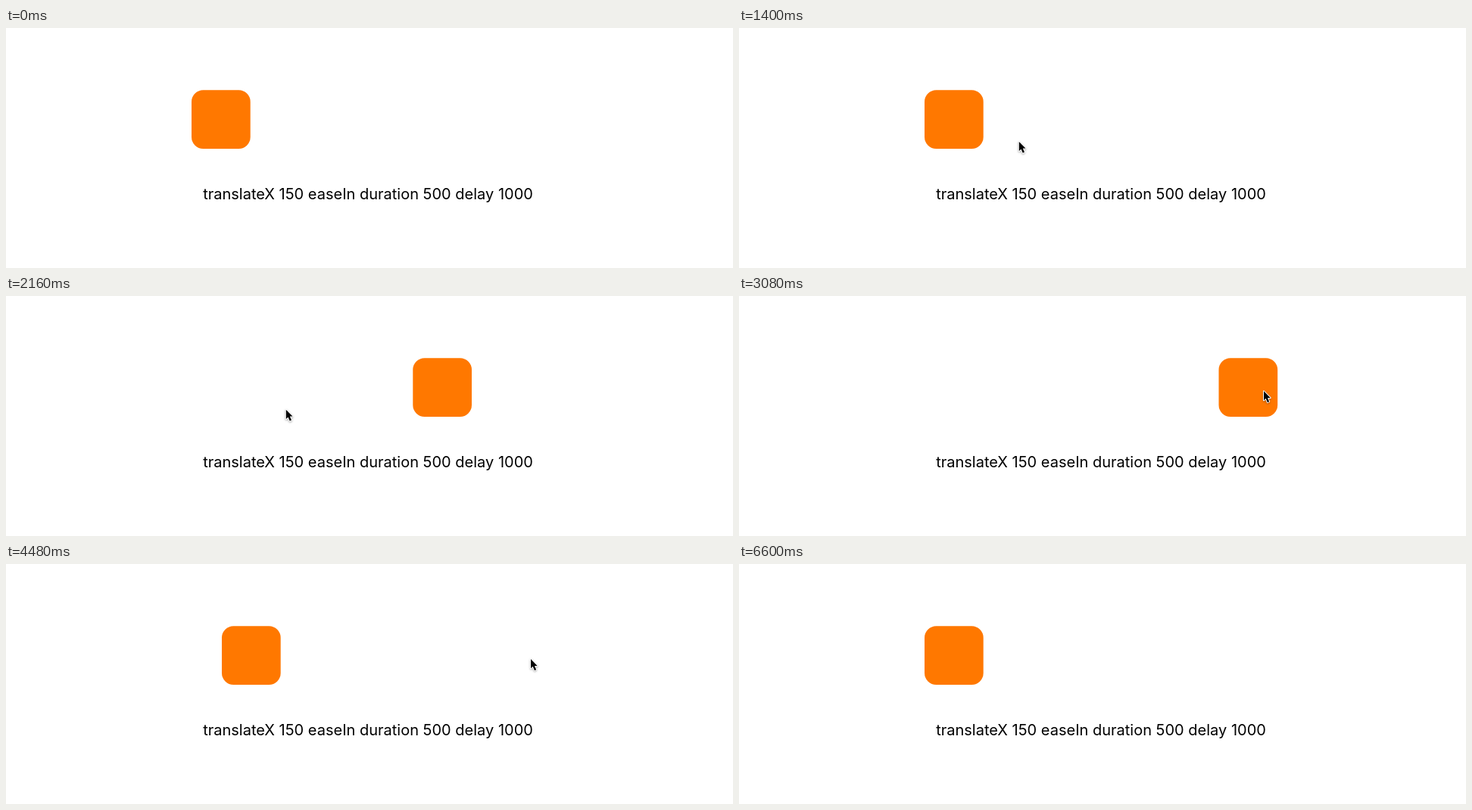
An HTML page with a canvas that plays this animation: 960 px wide and 318 px high, repeating every 6640 ms.

```html
<!DOCTYPE html>
<html lang="en">
<head>
<meta charset="utf-8">
<title>translateX easeIn</title>
<style>
  html, body { margin: 0; width: 100%; height: 100%; overflow: hidden; background: #fff; }
  canvas { display: block; width: 960px; height: 318px; }
</style>
</head>
<body>
<canvas id="stage"></canvas>
<script>
const LOOP = 6640;
const STEP = 40;
const MOVE = 500;
const LEFT = 245, TRAVEL = 388.5, TOP = 82.3, SIZE = 77.7, RADIUS = 15.5;
const LABEL = 'translateX 150 easeIn duration 500 delay 1000';

const canvas = document.getElementById('stage');
const ratio = window.devicePixelRatio || 1;
canvas.width = 960 * ratio;
canvas.height = 318 * ratio;
const ctx = canvas.getContext('2d');
ctx.scale(ratio, ratio);

const clamp = v => Math.min(1, Math.max(0, v));
const progress = (t, start, length) => clamp((t - start) / length);
const easeOut = u => 1 - (1 - u) ** 2;
const easeInOut = u => u * u * (3 - 2 * u);

// cubic-bezier(0.42, 0, 1, 1)
function easeIn(u) {
  let lo = 0, hi = 1;
  for (let i = 0; i < 24; i++) {
    const s = (lo + hi) / 2;
    const x = 1.26 * (1 - s) ** 2 * s + 3 * (1 - s) * s * s + s ** 3;
    if (x < u) lo = s; else hi = s;
  }
  return lo * lo * (3 - 2 * lo);
}

function squareX(t) {
  if (t < 1800) return LEFT;
  const out = easeIn(progress(t, 1739, MOVE));
  const back = easeIn(progress(t, 4011.5, MOVE));
  return LEFT + TRAVEL * (out - back);
}

function between(a, b, u) {
  return a.map((v, i) => v + (b[i] - v) * u);
}

// Pointer tip, or null while it is out of sight
function pointerAt(t) {
  const enter = [286, 124], rest = [369.3, 150], press = [692.5, 125.3], leave = [750, 10];
  if (t < 1040 || t >= 5240) return null;
  if (t < 2440) return between(enter, rest, easeOut(progress(t, 1040, 360)));
  if (t < 4800) return between(rest, press, easeInOut(progress(t, 2440, 560)));
  return between(press, leave, easeInOut(progress(t, 4920, 280)));
}

function drawSquare(x) {
  ctx.fillStyle = '#ff7800';
  ctx.beginPath();
  ctx.roundRect(x, TOP, SIZE, SIZE, RADIUS);
  ctx.fill();
}

function drawLabel() {
  ctx.fillStyle = '#000';
  ctx.font = '20px Inter, sans-serif';
  ctx.textAlign = 'center';
  ctx.fillText(LABEL, 478, 227);
}

function drawPointer([x, y]) {
  const shape = new Path2D('M0.5 0.8V13L3.2 10.5L5.4 15.6L7.7 14.6L5.5 9.6H9.2Z');
  ctx.save();
  ctx.translate(x, y);
  ctx.lineWidth = 2;
  ctx.lineJoin = 'round';
  ctx.strokeStyle = '#fff';
  ctx.shadowColor = 'rgba(0, 0, 0, 0.35)';
  ctx.shadowBlur = 2.5 * ratio;
  ctx.shadowOffsetY = ratio;
  ctx.stroke(shape);
  ctx.shadowColor = 'transparent';
  ctx.fillStyle = '#000';
  ctx.fill(shape);
  ctx.restore();
}

function draw(time) {
  const t = Math.floor((time % LOOP) / STEP) * STEP;
  ctx.fillStyle = '#fff';
  ctx.fillRect(0, 0, 960, 318);
  drawSquare(squareX(t));
  drawLabel();
  const tip = pointerAt(t);
  if (tip) drawPointer(tip);
}

const begin = performance.now();
function tick() {
  draw(performance.now() - begin);
  requestAnimationFrame(tick);
}
tick();
</script>
</body>
</html>
```
